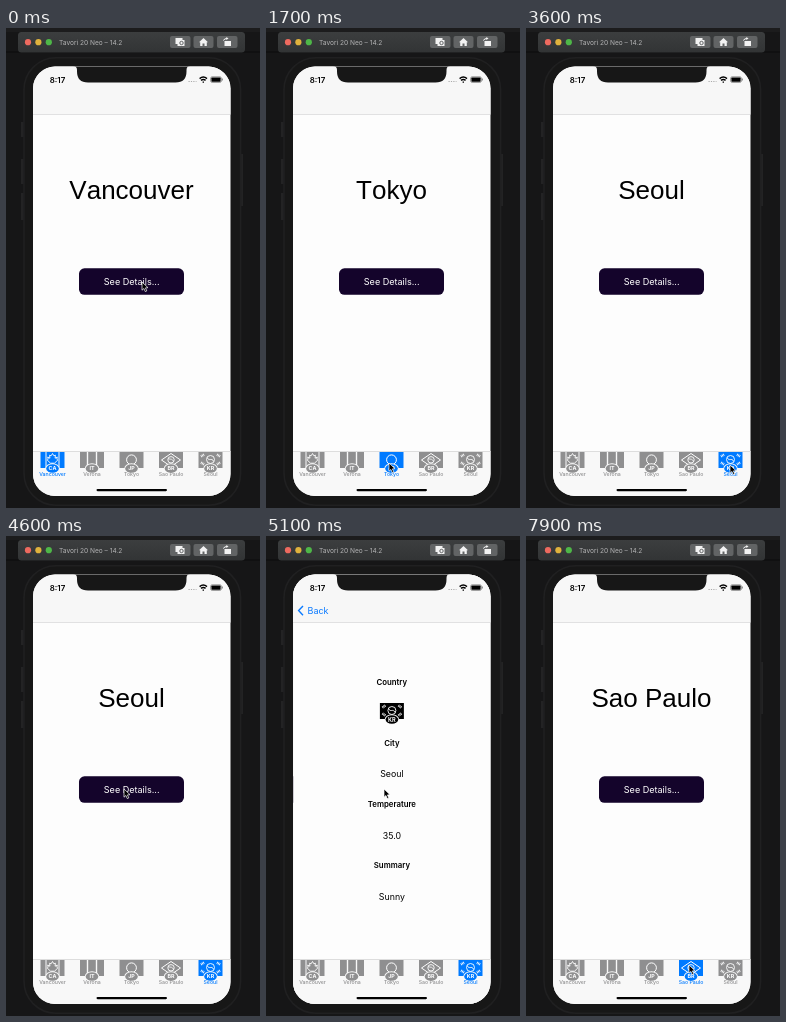
Recreate the animation shown at these times as an HTML page. Size 254 px wide and 480 px high, loop 8 s.

```html
<!DOCTYPE html>
<html lang="en">
<head>
<meta charset="utf-8">
<title>City tabs</title>
<style>
  html, body { margin: 0; width: 100%; height: 100%; overflow: hidden; background: #161617; }
  svg { display: block; width: 100%; height: 100%; font-family: Inter, Roboto, sans-serif; }
  .mid { text-anchor: middle; }
  .city { font: 26px "Liberation Sans", Arial, sans-serif; font-kerning: none; }
  .head { font-size: 7.8px; font-weight: 600; }
  .value { font-size: 8.8px; }
  .tab { font-size: 5.2px; font-weight: 500; }
  .line { fill: none; stroke: #fff; }
</style>
</head>
<body>
<svg viewBox="0 0 254 480">
  <defs>
    <clipPath id="screen"><rect x="27" y="38.5" width="197.5" height="429.5" rx="22"/></clipPath>
    <linearGradient id="bar" x2="0" y2="1">
      <stop stop-color="#3c3e3f"/><stop offset="1" stop-color="#323435"/>
    </linearGradient>
    <g id="oval">
      <ellipse cy="16.5" rx="7.2" ry="5.2" fill="#f8f8f8"/>
      <ellipse cy="16.5" rx="6.3" ry="4.3"/>
    </g>
    <g id="CA">
      <path d="M-12 0h5v16h-5zM-6 0h12v16h-12zM7 0h5v16h-5z"/>
      <path class="line" stroke-width=".9" d="M0 1.5l1.4 2.3 1.5-.6-.3 3 2.2-1.2-.5 2.2 1 .8-3.3 3.2H-2l-3.3-3.2 1-.8-.5-2.2 2.2 1.2-.3-3 1.5 .6z"/>
    </g>
    <path id="IT" d="M-12 0h6.8v16h-6.8zM-3.8 0h7.6v16h-7.6zM5.2 0h6.8v16h-6.8z"/>
    <g id="JP">
      <path d="M-12 0h24v16h-24z"/>
      <circle class="line" cy="7.8" r="4.9"/>
    </g>
    <g id="BR">
      <path d="M-12 0h24v16h-24z"/>
      <path class="line" d="M-9.5 8L0 1.5 9.5 8 0 14.5z"/>
      <circle class="line" cy="7.8" r="3.2" stroke-width=".9"/>
      <path class="line" stroke-width=".8" d="M-3 6.8Q1 6.5 2.8 9.2"/>
    </g>
    <g id="KR">
      <path d="M-12 0h24v16h-24z"/>
      <circle class="line" cy="7.5" r="4" stroke-width=".9"/>
      <path class="line" stroke-width=".9" d="M-3.3 5.5C-1.5 10 1 5 3.3 9.5"/>
      <path class="line" stroke-width="2.4" stroke-dasharray=".8 .6" d="M-9.5 4.5l3-2M9.5 4.5l-3-2M-9.5 10.5l3 2M9.5 10.5l-3 2"/>
    </g>
  </defs>

  <!-- simulator window -->
  <path fill="#1c1c1d" d="M0 0h254v4H0z"/>
  <path fill="#101011" d="M0 23h254v2H0z"/>
  <rect x="12" y="4" width="227" height="20.5" rx="3.5" fill="url(#bar)"/>
  <circle cx="22" cy="14.2" r="3.1" fill="#ee6a5f"/>
  <circle cx="32.4" cy="14.2" r="3.1" fill="#e0b23d"/>
  <circle cx="42.8" cy="14.2" r="3.1" fill="#4eb748"/>
  <text x="53" y="17" font-size="6.6" fill="#b4b4b5">Tavori 20 Neo – 14.2</text>
  <g fill="#626465">
    <rect x="164" y="8" width="20.5" height="12" rx="2"/>
    <rect x="187.5" y="8" width="20" height="12" rx="2"/>
    <rect x="211" y="8" width="20.5" height="12" rx="2"/>
  </g>
  <g fill="#f2f2f2">
    <path d="M169.5 10h7v2h2v6h-7v-2h-2z"/>
    <path d="M193 14.3l4.5-4.3 4.5 4.3h-1.2v3.7h-2.3v-2.6h-2v2.6h-2.3v-3.7z"/>
    <path d="M218.5 13h6.5v5h-6.5z"/>
    <path class="line" d="M217.5 12.5q.5-2 3.5-2"/>
    <path d="M220.3 9l2.2 1.5-2.2 1.5z"/>
  </g>
  <circle cx="175.5" cy="15" r="1.7" fill="none" stroke="#626465"/>

  <!-- phone -->
  <path fill="#232324" d="M15 94h4v15h-4zM15 131h4v25h-4zM15 165h4v27h-4zM233 126h4v52h-4z"/>
  <rect x="18" y="29.7" width="216.6" height="447.6" rx="32" fill="#171717" stroke="#202021" stroke-width="1.6"/>
  <g clip-path="url(#screen)">
    <path fill="#fdfdfd" d="M27 38h198v430H27z"/>
    <g id="home">
      <text id="city" class="mid city" x="125.5" y="171"></text>
      <rect x="73" y="240.3" width="105" height="26.5" rx="5.5" fill="#14042b"/>
      <text class="mid" x="125.7" y="257" font-size="9.05" fill="#fff">See Details...</text>
    </g>
    <path id="dim" d="M27 38h198v430H27z"/>
    <g id="detail">
      <path fill="#fdfdfd" d="M27 38h198v430H27z"/>
      <use href="#KR" x="125.7" y="167"/>
      <use href="#oval" x="125.7" y="167"/>
      <text class="mid" x="125.7" y="185.6" font-size="5.6" font-weight="700" fill="#fff">KR</text>
    </g>
    <path fill="#f7f7f7" d="M27 38h198v48H27z"/>
    <path fill="#d9d9da" d="M27 86h198v.7H27z"/>
    <g id="back" fill="#0a7aff">
      <path d="M37 70l-4.4 4.6 4.4 4.6" fill="none" stroke="#0a7aff" stroke-width="1.4"/>
      <text id="backText" y="77.7" font-size="9">Back</text>
    </g>
    <path fill="#171717" d="M67 38q4 0 4 4v1.5q0 11 11 11h87.5q11 0 11-11V42q0-4 4-4z"/>
    <text x="43.8" y="54.6" font-size="7.9" font-weight="600">8:17</text>
    <path stroke="#aaa" stroke-width="1.2" stroke-dasharray="1.2 1.2" d="M182.5 53.5h8"/>
    <g fill="none" stroke="#000" stroke-width="1.4">
      <path d="M193.6 50.6q3.7-3.2 7.4 0M195 52.4q2.3-2 4.6 0"/>
      <path d="M196.6 54.1h1.4"/>
    </g>
    <rect x="204.6" y="48.8" width="10.8" height="5.6" rx="1.6" fill="none" stroke="#555" stroke-width=".6"/>
    <rect x="205.4" y="49.5" width="9.2" height="4.2" rx=".8"/>
    <path fill="#777" d="M216 50.5h.8v2h-.8z"/>
    <path fill="#f8f8f8" d="M27 423h198v45H27z"/>
    <path fill="#d4d4d5" d="M27 423h198v.7H27z"/>
    <g id="tabs"></g>
    <rect x="90.5" y="461" width="70.5" height="2.2" rx="1.1"/>
  </g>
  <path id="cursor" d="M0 0v8.2l1.9-1.7 1.4 3.1 1.5-.7-1.4-3 2.6-.2z" stroke="#fff" stroke-width=".7"/>
</svg>
<script>
const LOOP = 8000, PUSH = 4600, LEAVE = 7600;
const $ = id => document.getElementById(id);
const cities = [["Vancouver", "CA"], ["Verona", "IT"], ["Tokyo", "JP"], ["Sao Paulo", "BR"], ["Seoul", "KR"]];
const taps = [[0, 0], [1100, 1], [1600, 2], [2200, 3], [3000, 4], [LEAVE, 3]];  // time, tab
const path = [  // time, x, y
  [0, 136, 254], [100, 136, 254], [900, 84, 434], [1200, 84, 434], [1600, 123, 435],
  [1900, 123, 435], [2150, 163, 434], [2500, 163, 434], [2750, 204, 437], [3800, 204, 437],
  [4500, 118, 253], [5850, 118, 253], [6200, 204, 438], [6350, 204, 438], [6500, 139, 315],
  [6800, 132, 296], [7400, 163, 429], [LOOP, 163, 429]
];

$("tabs").innerHTML = cities.map(([name, code], i) => `
  <g transform="translate(${46.5 + i * 39.5} 424)">
    <use href="#${code}"/><use href="#oval"/>
    <text class="mid" y="18.4" font-size="5.4" font-weight="700" fill="#fff">${code}</text>
    <text class="mid tab" y="24.2">${name}</text>
  </g>`).join("");

const rows = [["Country"], ["City", "Seoul"], ["Temperature", "35.0"], ["Summary", "Sunny"]];
$("detail").innerHTML += rows.map(([head, value = ""], i) => `
  <text class="mid head" x="125.7" y="${149 + i * 61.1}">${head}</text>
  <text class="mid value" x="125.7" y="${180.3 + i * 61.1}">${value}</text>`).join("");

function cursorAt(t) {
  const i = path.findIndex(p => p[0] > t);
  const [t0, x0, y0] = path[i - 1], [t1, x1, y1] = path[i];
  const u = (t - t0) / (t1 - t0), e = u * u * (3 - 2 * u);
  return [x0 + (x1 - x0) * e, y0 + (y1 - y0) * e];
}

function draw(now) {
  const t = now % LOOP;
  const tab = taps.filter(p => p[0] <= t).pop()[1];
  $("city").textContent = cities[tab][0];
  [...$("tabs").children].forEach((g, i) => g.setAttribute("fill", i === tab ? "#007aff" : "#8f8f90"));

  // critically damped spring: 1 = off screen, 0 = settled
  const w = Math.max(0, t - PUSH) * .0185;
  const away = t < LEAVE ? (1 + w) * Math.exp(-w) : 1;
  $("home").setAttribute("transform", `translate(${-59.4 * (1 - away)} 0)`);
  $("detail").setAttribute("transform", `translate(${198 * away} 0)`);
  $("dim").setAttribute("opacity", .1 * (1 - away));
  $("back").setAttribute("opacity", 1 - away);
  $("backText").setAttribute("x", 41.5 + 30 * away);
  $("cursor").setAttribute("transform", `translate(${cursorAt(t)})`);
  requestAnimationFrame(draw);
}
requestAnimationFrame(draw);
</script>
</body>
</html>
```
